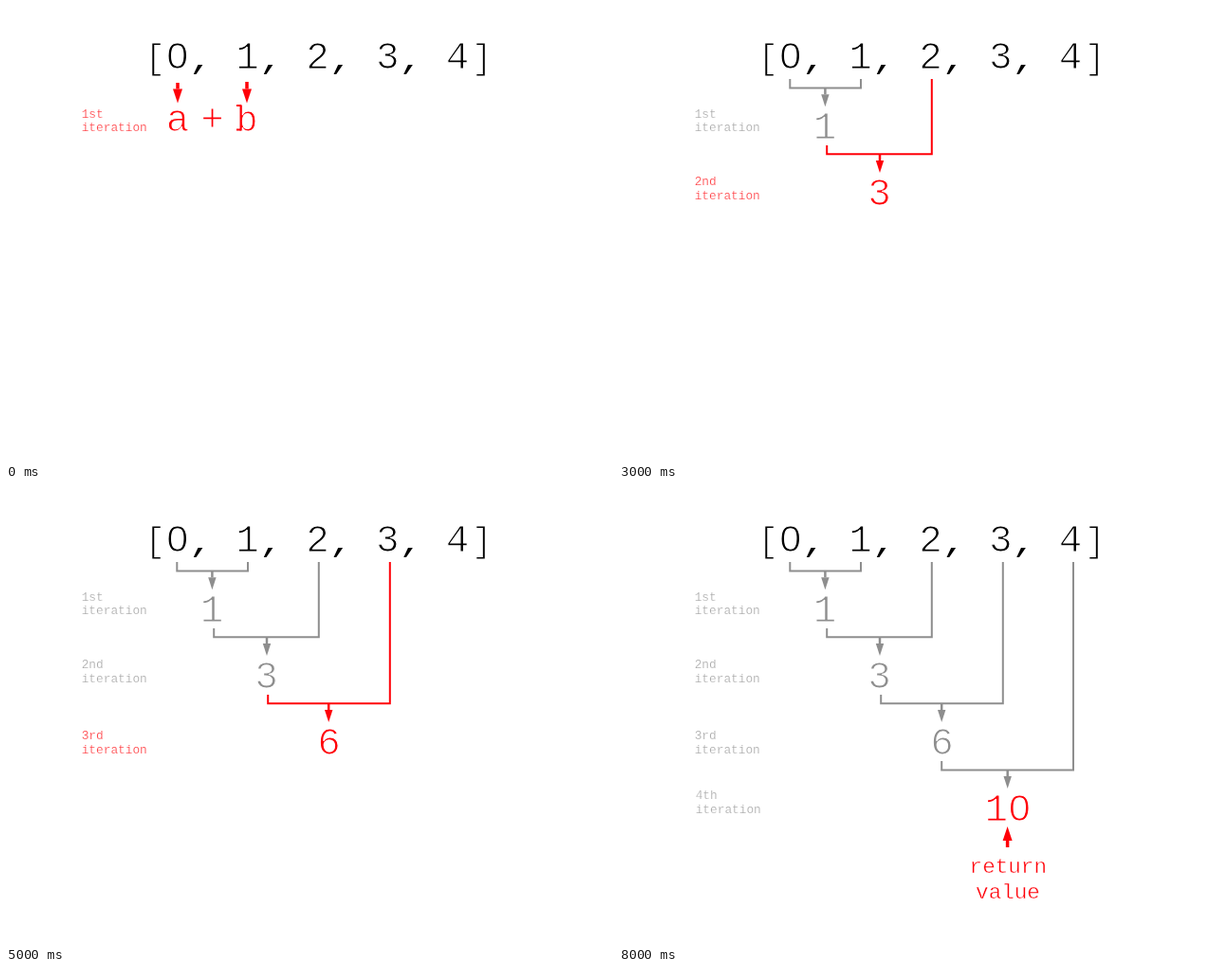
An HTML page that plays this animation: 640x480 px, repeating every 9 s.

```html
<!DOCTYPE html>
<html lang="en">
<head>
<meta charset="utf-8">
<title>Reducing a list step by step</title>
<style>
  html, body { margin: 0; width: 100%; height: 100%; overflow: hidden; background: #fff; }
  svg { display: block; width: 640px; height: 480px; }
  text { font-family: "Liberation Mono", "Courier New", monospace; fill: currentColor; white-space: pre; }
  /* a white outline thins the letters */
  .big { font-size: 41px; stroke: #fff; stroke-width: 1.2px; }
  .tall { font-size: 38.5px; stroke: #fff; stroke-width: 1.1px; }
  .mid { text-anchor: middle; }
  .comma { font-size: 32px; letter-spacing: 1.9px; stroke: none; font-weight: bold; font-style: italic; }
  .bracket { font-size: 36px; letter-spacing: .5px; }
  .label { font-size: 12.8px; opacity: .75; stroke: #fff; stroke-width: .2px; }
  .result { font-size: 22.6px; stroke: #fff; stroke-width: .5px; }
  .line { fill: none; stroke: currentColor; stroke-width: 2; }
  .head { fill: currentColor; }
  .hole { fill: #fff; }
  .timed { visibility: hidden; animation: 9s step-end infinite; }
</style>
</head>
<body>
<svg id="stage" viewBox="0 0 640 480"></svg>
<script>
const SECONDS = 9, RED = '#ff0008', GRAY = '#8e8e8e';
let css = '', count = 0;

// Visible from `on`, gray from `dim`, hidden from `off` (seconds).
function timed(content, on, dim = SECONDS, off = SECONDS) {
  const name = 'part' + count++;
  const key = (t, rule) => t < SECONDS ? `${t / SECONDS * 100}% { ${rule} }\n` : '';
  css += `@keyframes ${name} {\n` +
    key(0, `visibility: hidden; color: ${RED}`) +
    key(on, `visibility: visible; color: ${RED}`) +
    key(dim, `visibility: visible; color: ${GRAY}`) +
    key(off, `visibility: hidden; color: ${RED}`) + '}\n';
  return `<g class="timed" style="animation-name: ${name}">${content}</g>`;
}

const text = (x, y, s, cls) => `<text x="${x}" y="${y}" class="${cls}">${s}</text>`;
const big = (x, y, s) => text(x, y, s, 'big mid');
const hole = (x, y) => `<ellipse class="hole" cx="${x}" cy="${y}" rx="3.6" ry="5"/>`;

function arrow(x, from, tip, shaft = 3.5, half = 5, length = 15) {
  const base = tip - Math.sign(tip - from) * length;
  return `<path class="line" style="stroke-width: ${shaft}" d="M${x} ${from}V${base}"/>` +
    `<path class="head" d="M${x - half} ${base}H${x + half}L${x} ${tip}Z"/>`;
}

const bracket = (left, top, right, bottom, mid) =>
  `<path class="line" d="M${left} ${top}V${bottom}H${right}V77"/>` +
  arrow(mid, bottom, bottom + 19.7, 2.5, 4.2, 13);

function sum(a, b, y, top, tip) {
  const serifs = `<path class="line" d="M${b - 11} ${y - 26.4}h5m-5 25.4h5"/>`;
  return big(a, y, 'a') + big((a + b) / 2, y, '+') + text(b, y, 'b', 'tall mid') + serifs +
    arrow(a, top, tip) + arrow(b, 80, tip);
}

const steps = [
  { name: '1st', x: 79.7, y: 117.5, sum: [181, 254, 131.5, 81, 102.5],
    link: [180.3, 77, 255, 86.5, 217.4], value: '1', at: 217 },
  { name: '2nd', x: 79.7, y: 189, sum: [217, 328, 202.5, 149, 170.5],
    link: [219.2, 147, 329.8, 156.3, 275], value: '3', at: 274.5 },
  { name: '3rd', x: 79.7, y: 264, sum: [274.5, 404.5, 273, 219, 241],
    link: [276.2, 217, 404.8, 226.3, 340.2], value: '6', at: 340.5 },
  { name: '4th', x: 80.7, y: 327, sum: [340, 477.5, 343, 289, 311],
    link: [340.2, 287, 479, 296.4, 409.7], value: '10', at: 410 }
];

const list = '[0, 1, 2, 3, 4]'.replace(/[,[\]]/g, c => c === ','
  ? '<tspan class="comma" dx="3.5">,</tspan>'
  : `<tspan class="bracket" dx="2.5">${c}</tspan>`);
let out = text(143.9, 65.5, list, 'big') + hole(180.8, 52);

steps.forEach((s, i) => {
  const t = i * 2, valueY = s.link[3] + 53.2;
  const last = i === steps.length - 1;
  const label = text(s.x, s.y, s.name, 'label') + text(s.x, s.y + 14.5, 'iteration', 'label');
  const value = big(s.at, valueY, s.value) + (last ? hole(s.at + 12.3, valueY - 13.5) : '');
  out += timed(label, t, t + 2) +
    timed(sum(...s.sum), t, SECONDS, t + 1) +
    timed(bracket(...s.link), t + 1, t + 2) +
    timed(value, t + 1, t + 3);
});

out += timed(arrow(409.6, 378, 356) +
  text(410.3, 405, 'return', 'result mid') +
  text(410, 431.5, 'value', 'result mid'), 8);

const style = document.createElement('style');
style.textContent = css;
document.head.append(style);
document.getElementById('stage').innerHTML = out;
</script>
</body>
</html>
```
